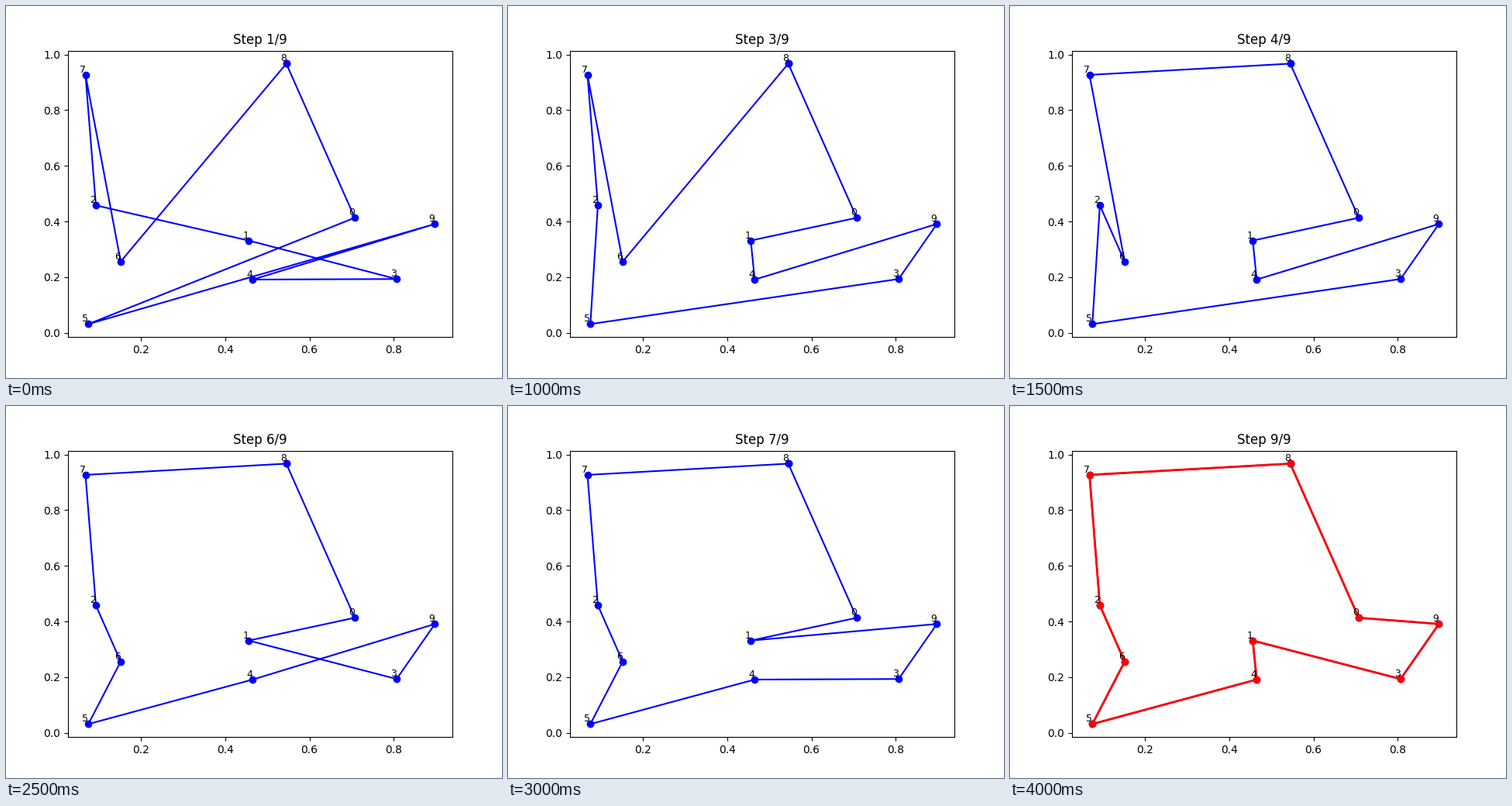
A matplotlib script that plays this animation: 640x480 px, repeating every 4.5 s.

```python
import numpy as np
import matplotlib.pyplot as plt
from matplotlib.animation import FuncAnimation

cities = np.array([
    (0.7075, 0.4134), (0.4558, 0.3315), (0.0927, 0.4580), (0.8069, 0.1934),
    (0.4651, 0.1914), (0.0749, 0.0315), (0.1516, 0.2560), (0.0680, 0.9268),
    (0.5449, 0.9672), (0.8979, 0.3911),
])
# Each step exchanges two cities in the tour.
swaps = [(4, 9), (1, 5), (6, 7), (2, 6), (3, 4), (3, 9), (1, 3), (3, 9)]
steps = len(swaps) + 1

# The shortest tour visits the cities by angle around their centre.
dx, dy = (cities - cities.mean(axis=0)).T
best = list(np.argsort(np.arctan2(dy, dx) % (2 * np.pi)))


def route(step):
    """Closed path at a step, found by undoing the later swaps."""
    tour = list(best)
    for a, b in reversed(swaps[step:]):
        i, j = tour.index(a), tour.index(b)
        tour[i], tour[j] = b, a
    return cities[tour + tour[:1]].T


fig, ax = plt.subplots(figsize=(6.4, 4.8), dpi=100)
path, = ax.plot(*route(0), "bo-")
final, = ax.plot(*route(steps - 1), "ro-", linewidth=2)
title = ax.set_title("")
for n, (x, y) in enumerate(cities):
    ax.text(x, y, str(n), fontsize=9, ha="right", va="bottom")


def draw(step):
    path.set_data(*route(step))
    final.set_visible(step == steps - 1)
    title.set_text(f"Step {step + 1}/{steps}")
    return path, final, title


anim = FuncAnimation(fig, draw, frames=steps, interval=500,
                     init_func=lambda: draw(0), repeat=True, repeat_delay=0)
plt.show()
```
